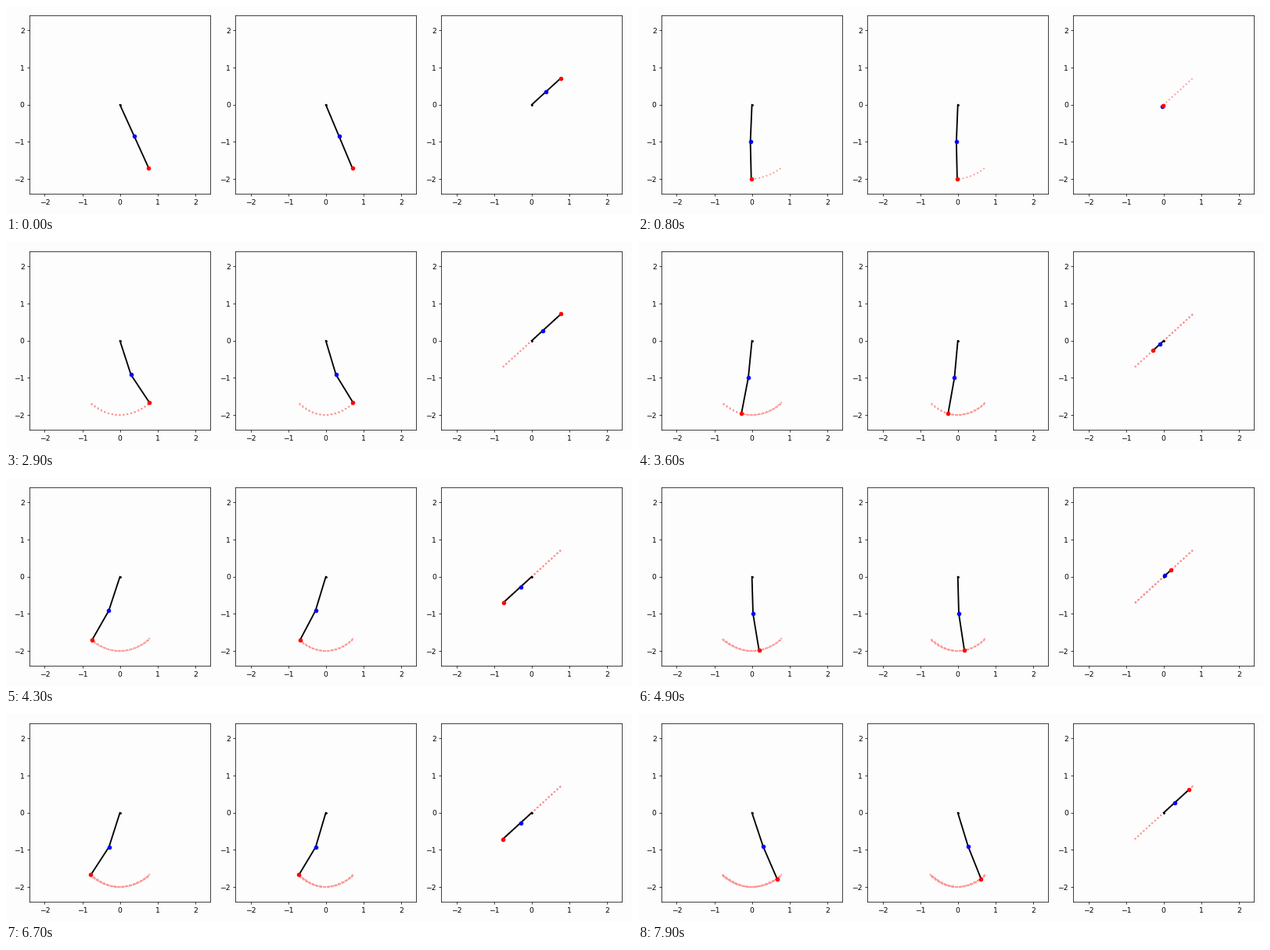
These frames come from a looping animation (800x267 px, 8000 ms). A matplotlib script:

```python
import matplotlib.pyplot as plt
import numpy as np
from matplotlib.animation import FuncAnimation

W, H, DPI = 800, 267, 64
K = 200 / 3 / DPI  # keeps point sizes as on a 12 inch wide figure
FRAMES, INTERVAL = 80, 100
TICK, SUB, HOLD = 40, 20, 3  # ms per simulated pose, substeps, poses held at rest
POSES = FRAMES * INTERVAL // TICK
G = 9.81
BG = "#fdfdfd"

plt.rcParams.update({
    "font.family": "DejaVu Sans",
    "font.size": 10 * K,
    "axes.linewidth": 0.8 * K,
    "axes.facecolor": BG,
    "figure.facecolor": BG,
})


def deriv(s):
    """Planar double pendulum with unit masses and unit rods."""
    a, b, wa, wb = s
    d = a - b
    den = 3 - np.cos(2 * d)
    acc_a = (-3 * G * np.sin(a) - G * np.sin(a - 2 * b)
             - 2 * np.sin(d) * (wb**2 + wa**2 * np.cos(d))) / den
    acc_b = 2 * np.sin(d) * (2 * wa**2 + 2 * G * np.cos(a)
                             + wb**2 * np.cos(d)) / den
    return np.array([wa, wb, acc_a, acc_b])


def rk4(s, h):
    k1 = deriv(s)
    k2 = deriv(s + h / 2 * k1)
    k3 = deriv(s + h / 2 * k2)
    k4 = deriv(s + h * k3)
    return s + h / 6 * (k1 + 2 * k2 + 2 * k3 + k4)


def simulate(angle):
    """Both rod angles at every pose, released from rest."""
    s = np.array([angle, angle, 0.0, 0.0])
    angles = [s[:2]]
    while len(angles) < POSES:
        for _ in range(SUB):
            s = rk4(s, TICK / 1000 / SUB)
        angles.append(s[:2])
    return np.array(angles)


# The rods start tilted by pi/8 about both horizontal axes.
tilt = np.pi / 8
sx, sy = np.sin(tilt), np.sin(tilt) * np.cos(tilt)
heading = np.array([sx, sy]) / np.hypot(sx, sy)


def rod(angle):
    r = np.sin(angle)
    return np.column_stack([heading[0] * r, heading[1] * r, -np.cos(angle)])


theta = simulate(np.arccos(np.cos(tilt) ** 2))
elbow = rod(theta[:, 0])
tip = elbow + rod(theta[:, 1])

fig = plt.figure(figsize=(W / DPI, H / DPI), dpi=DPI)
views = []
for col, axes in enumerate([(0, 2), (1, 2), (0, 1)]):
    left, width, top, height = 30.2 + 263.1 * col, 230.8, 12.3, 228.9
    ax = fig.add_axes([left / W, 1 - (top + height) / H, width / W, height / H])
    ax.set(xlim=(-2.4, 2.4), ylim=(-2.4, 2.4),
           xticks=range(-2, 3), yticks=range(-2, 3))
    ax.tick_params(length=3.5 * K, width=0.8 * K, pad=3.5 * K)
    trail, = ax.plot([], [], "r:", lw=2 * K, alpha=0.4)
    arm, = ax.plot([], [], "k-", lw=2 * K)
    ax.plot(0, 0, "ko", ms=2 * K, mew=K)
    dots = [ax.plot([], [], c + "o", ms=5 * K, mew=K)[0] for c in "br"]
    views.append((list(axes), trail, arm, dots))


def update(i):
    n = max(0, i * INTERVAL // TICK - HOLD)
    artists = []
    for axes, trail, arm, dots in views:
        e, t = elbow[n, axes], tip[n, axes]
        trail.set_data(*tip[:n + 1, axes].T)
        arm.set_data(*np.array([[0, 0], e, t]).T)
        for dot, p in zip(dots, (e, t)):
            dot.set_data([p[0]], [p[1]])
        artists += [trail, arm, *dots]
    return artists


anim = FuncAnimation(fig, update, frames=FRAMES, interval=INTERVAL,
                     init_func=lambda: update(0), repeat=True, repeat_delay=0)
plt.show()
```
